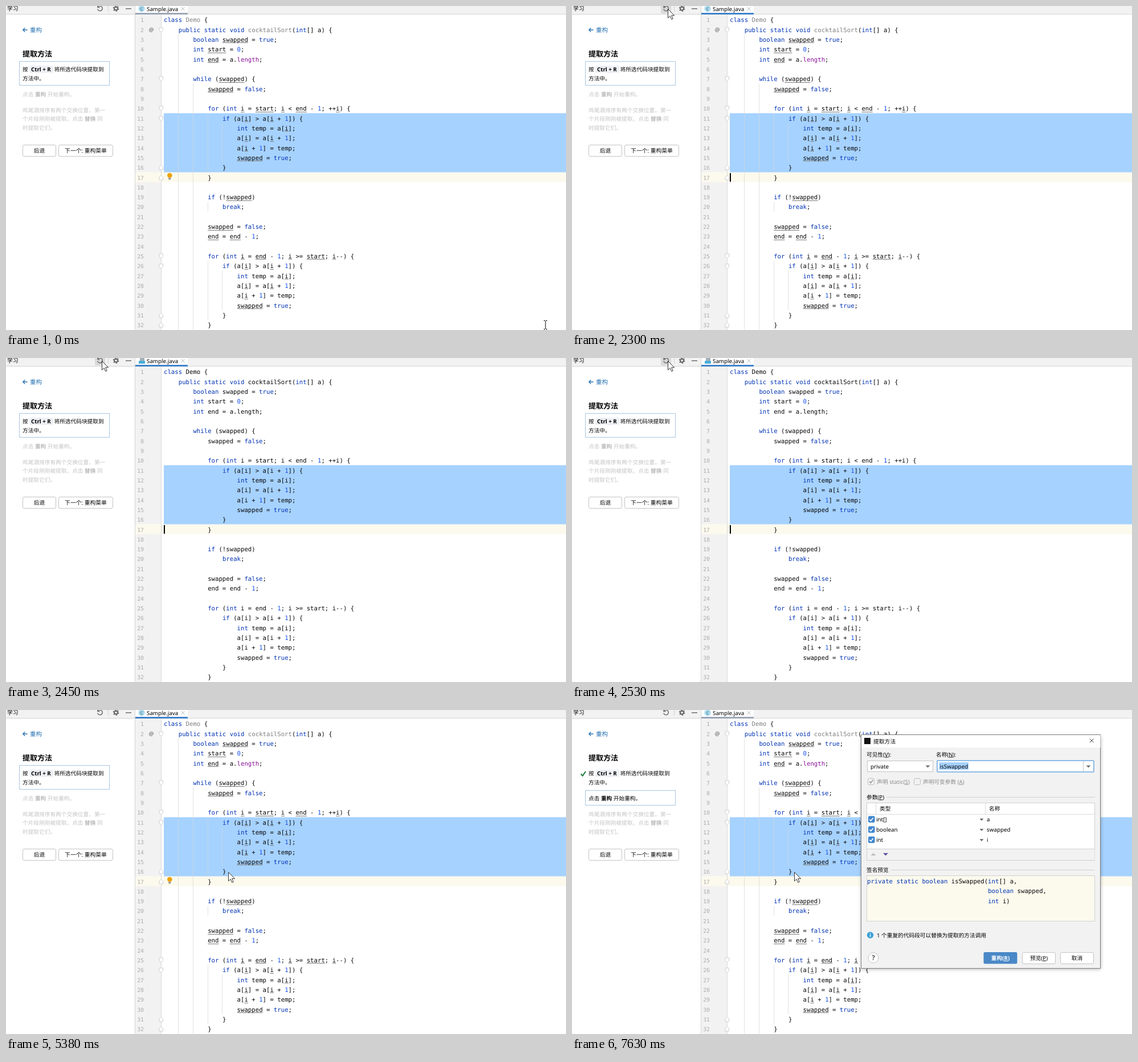
Recreate the animation shown at these times as an HTML page. Size 983 by 570 pixels, loop 8 s.

```html
<!DOCTYPE html>
<html lang="zh-CN">
<head>
<meta charset="utf-8">
<style>
  html, body { margin: 0; width: 100%; height: 100%; overflow: hidden; background: #fff; }
  svg { display: block; width: 983px; height: 570px; }
  text { font-family: "Noto Sans", "Noto Sans CJK SC", "Noto Sans CJK", sans-serif; white-space: pre; text-rendering: geometricPrecision; }
  .mono { font-family: "DejaVu Sans Mono", monospace; font-size: 10.68px; fill: #080808; }
  .b { font-weight: 700; }
  .u { text-decoration: underline; text-decoration-thickness: 1px; }
  .kw { fill: #0033b3; }
  .num { fill: #1750eb; }
  .rich .unused { fill: #808080; }
  .rich .field { fill: #871094; }
  .extra { display: none; }
  .rich .extra { display: inline; }
  .step { fill: #c4c4c4; }
  .step .b { fill: #bababa; }
  .step .key { fill: #f7f7f8; }
  .step.on, .step.on .b { fill: #000; }
  .step.on .key { fill: #edf0f4; }
</style>
</head>
<body>
<svg id="stage" viewBox="0 0 983 570"></svg>
<script>
const CH = 6.43, ROW = 17.32, LEFT = 277, TOP = 15.4, BASE = 13;
const rowY = n => TOP + ROW * (n - 1);

const SOURCE = `class Demo {
    public static void cocktailSort(int[] a) {
        boolean swapped = true;
        int start = 0;
        int end = a.length;

        while (swapped) {
            swapped = false;

            for (int i = start; i < end - 1; ++i) {
                if (a[i] > a[i + 1]) {
                    int temp = a[i];
                    a[i] = a[i + 1];
                    a[i + 1] = temp;
                    swapped = true;
                }
            }

            if (!swapped)
                break;

            swapped = false;
            end = end - 1;

            for (int i = end - 1; i >= start; i--) {
                if (a[i] > a[i + 1]) {
                    int temp = a[i];
                    a[i] = a[i + 1];
                    a[i + 1] = temp;
                    swapped = true;
                }
            }`.split('\n');

// Drawing helpers
const attrs = o => Object.entries(o).map(([k, v]) => `${k}="${v}"`).join(' ');
const rect = (x, y, w, h, fill, o = {}) =>
  `<rect x="${x}" y="${y}" width="${w}" height="${h}" ${attrs(fill ? { fill, ...o } : o)}/>`;
const box = (x, y, w, h, fill, stroke, o = {}) =>
  rect(x + .5, y + .5, w, h, fill, { stroke, ...o });
const path = (d, o = {}) => `<path d="${d}" ${attrs({ fill: 'none', ...o })}/>`;
const dot = (x, y, r, fill, o = {}) =>
  `<circle cx="${x}" cy="${y}" r="${r}" fill="${fill}" ${attrs(o)}/>`;
const group = (id, body, o = {}) => `<g id="${id}" ${attrs(o)}>${body}</g>`;
const text = (x, mid, s, size = 9.7, o = {}) =>
  `<text x="${x}" y="${mid + size * .37}" font-size="${size}" ${attrs(o)}>${s}</text>`;
const bold = s => `<tspan class="b">${s}</tspan>`;
const hot = (s, k) => `${s}(<tspan class="u">${k}</tspan>)`;
const mid = { 'text-anchor': 'middle' };

const KEYWORDS = /^(class|public|private|static|void|boolean|int|while|for|if|break|true|false)$/;
const esc = s => s.replace(/</g, '&lt;').replace(/>/g, '&gt;');
function paint(line) {
  return line.split(/(\w+)/).map(w => {
    const cls = KEYWORDS.test(w) ? 'kw' : /^\d+$/.test(w) ? 'num'
      : /^(Demo|cocktailSort)$/.test(w) ? 'unused' : w === 'length' ? 'field' : '';
    return cls ? `<tspan class="${cls}">${w}</tspan>` : esc(w);
  }).join('');
}
function code(x, y, line) {
  const indent = line.search(/\S/);
  return indent < 0 ? '' : `<text class="mono" x="${x + indent * CH}" y="${y}">${paint(line.trim())}</text>`;
}
const underlines = (line, n) => [...line.matchAll(/\b(swapped|start|end|i)\b/g)].map(m =>
  rect(LEFT + m.index * CH, Math.round(rowY(n) + 14.4), m[0].length * CH, 1, '#777')).join('');

function foldMark(n, closing) {
  const s = closing ? -1 : 1, y = Math.round(rowY(n) + 9.1);
  return path(`M269 ${y - 4 * s}H275.5V${y + s}L272.3 ${y + 4 * s}L269 ${y + s}Z`, { fill: '#fff', stroke: '#cfcfcf' });
}
const guide = (col, from, to) =>
  rect(Math.floor(LEFT + col * CH), rowY(from), 1, ROW * (to - from + 1), '#d6d6d6', { opacity: .7 });

function editor() {
  const lines = SOURCE.map((s, i) => code(LEFT, rowY(i + 1) + BASE, s)).join('');
  const numbers = SOURCE.map((s, i) => `<text class="mono" x="242" y="${rowY(i + 1) + BASE}"
    text-anchor="end" style="fill:#adadad;font-size:9.8px">${i + 1}</text>`).join('');
  const guides = [[4, 3, 32], [8, 8, 32], [12, 11, 16], [16, 12, 15], [12, 20, 20], [12, 26, 31], [16, 27, 30]];
  return rect(226, 0, 757, 570, '#fff') + rect(226, 0, 757, 14, '#f2f2f2') + rect(226, 14, 757, 1, '#d8d8d8')
    + rect(227, 0, 92, 14, '#fff') + rect(227, 12, 92, 3, '#9ca7b8', { id: 'tabLine' })
    + group('classIcon', dot(238, 4.8, 5.6, '#a9d9ec') + text(238, 4.8, 'C', 7.5, { ...mid, fill: '#39606f' }))
    + group('fileIcon', rect(235, 0, 8, 6, '#a3afb8') + rect(233, 5, 11, 5, '#49aeda'))
    + text(247, 5, 'Sample.java', 9.8)
    + path('M307.5 2l6 6m0-6l-6 6', { stroke: '#b4b4b4' })
    + rect(226, 15, 46, 555, '#f2f2f2') + rect(226, rowY(17), 757, ROW, '#fcfaed')
    + rect(272, 15, 1, 555, '#d9d9d9') + rect(226, 0, 1, 570, '#d5d5d5')
    + rect(LEFT, rowY(11), 706, ROW * 6, '#a6d2ff')
    + group('marks', guides.map(g => guide(...g)).join('')
      + SOURCE.map((s, i) => underlines(s, i + 1)).join('')
      + [2, 7, 10, 11, 25, 26].map(n => foldMark(n)).join('')
      + [16, 17, 31, 32].map(n => foldMark(n, true)).join('')
      + text(255, 41, '@', 9.6, { ...mid, fill: '#555' }), { class: 'extra' })
    + numbers + lines
    + group('bulb', dot(287.3, 298, 4.3, '#eda200') + rect(285, 302.5, 4.6, 1.2, '#767676') + rect(285.6, 304.2, 3.4, 1.2, '#767676'))
    + rect(277, 294, 2, 15, '#000', { id: 'caret' });
}

function welcome() {
  const rows = [['随处搜索', 581, 'Ctrl+T'], ['项目视图', 581, 'Ctrl+Alt+L'], ['转到文件', 581, 'Ctrl+Shift+T'],
    ['最近的文件', 594, 'Ctrl+逗号'], ['导航栏', 568.5, 'Ctrl+F2'], ['将文件拖放到此处以打开', 0, '']];
  return rect(226, 0, 757, 570, '#cccccd') + rows.map(([label, x, keys], i) =>
    text(526, 194 + 30.8 * i, label, 12.95, { fill: '#787878' })
    + text(x, 194 + 30.8 * i, keys, 13.7, { fill: '#2f6ba3' })).join('');
}

const button = (x, y, w, label, size = 9.7) =>
  box(x, y, w, 20, '#fff', '#c4c4c4', { rx: 2.5 }) + text(x + w / 2 + .5, y + 10.3, label, size, mid);

function panel() {
  const step = (id, body) => group(id, body, { class: 'step' });
  return rect(0, 0, 226, 570, '#fff') + rect(0, 0, 226, 14, '#f2f2f2') + rect(0, 14, 226, 1, '#d1d1d1')
    + text(2, 4, '学习', 9.8)
    + rect(156, -3, 18, 16, '#d9d9d9', { id: 'hover', rx: 2 })
    + path('M162 1.2A4.3 4.3 0 1 1 160.8 5.4M161 -1V2.4H164.6', { stroke: '#6e6e6e', 'stroke-width': 1.5 })
    + rect(179, 0, 1, 10, '#d1d1d1')
    + dot(193, 4.5, 2.9, 'none', { stroke: '#6e6e6e', 'stroke-width': 2.2 })
    + dot(193, 4.5, 4.5, 'none', { stroke: '#6e6e6e', 'stroke-width': 1.8, 'stroke-dasharray': '2.3 2.41' })
    + rect(210, 4, 10, 1.5, '#6e6e6e')
    + path('M37.5 42H30M33.3 38.5L29.8 42l3.5 3.5', { stroke: '#2470b3', 'stroke-width': 1.3 })
    + text(42, 42, '重构', 10.5, { fill: '#2470b3' })
    + text(29, 84, '提取方法', 13, { class: 'b' })
    + group('box1', box(23, 97, 158, 42, '#fff', '#a9c6e0'))
    + group('box2', box(23, 141, 158, 26, '#fff', '#a9c6e0'))
    + path('M15.5 112.3L18.6 115.8L24 108', { id: 'check', stroke: '#1b7a37', 'stroke-width': 2 })
    + step('step1', rect(41, 105, 42, 13, '', { class: 'key', rx: 2 })
      + text(29, 111.4, '按') + text(44, 111.4, 'Ctrl + R', 9.7, { class: 'b' })
      + text(84.5, 111.4, '将所选代码块提取到') + text(29, 127, '方法中。'))
    + step('step2', text(29, 155, `点击 ${bold('重构')} 开始重构。`))
    + step('step3', text(29, 183.5, '鸡尾酒排序有两个交换位置。第一')
      + text(29, 198.7, `个片段刚刚被提取。点击 ${bold('替换')} 同`) + text(29, 214, '时提取它们。'))
    + button(29, 244, 58, '后退') + button(92, 244, 95, '下一个: 重构菜单', 9.8);
}

const down = (x, y, w = 4, h = 4, fill = '#6e6e6e') => path(`M${x - w} ${y - h / 2}h${2 * w}l${-w} ${h}z`, { fill });
const tick = (x, y, color) => path(`M${x - 3} ${y}l2.3 2.6l4-5.4`, { stroke: color, 'stroke-width': 1.6 });

function dialog() {
  const grey = { fill: '#8c8c8c' };
  const titled = (y, label, x) => text(517, y, label) + rect(x, y, 918 - x, 1, '#d1d1d1');
  const params = [['int[]', 'a'], ['boolean', 'swapped'], ['int', 'i']].map(([type, name], i) => {
    const y = 192.5 + 18 * i;
    return rect(520, y - 6, 11.5, 11.5, '#3f87cf', { rx: 2 }) + tick(525.3, y, '#fff')
      + text(534, y + .3, type, 9.8) + down(719, y + .5, 3.5) + text(728, y + .3, name, 9.8);
  }).join('');
  const signature = ['private static boolean isSwapped(int[] a,', ' '.repeat(33) + 'boolean swapped,', ' '.repeat(33) + 'int i)'];
  return rect(508, 46, 420, 410, '#000', { filter: 'url(#blur)', opacity: .3 })
    + box(507, 43, 420, 411, '#f2f2f2', '#7d7d7d') + rect(508, 44, 419.5, 22, '#fff')
    + rect(513, 49, 11, 11, '#111') + text(529, 55, '提取方法', 9.8)
    + path('M909 50.5l6.5 6.5m0-6.5l-6.5 6.5', { stroke: '#333' })
    + text(517, 78, hot('可见性', 'V') + ':') + text(639, 78, hot('名称', 'N') + ':')
    + box(518, 89, 115, 19, '#fff', '#c4c4c4') + text(524, 99, 'private', 9.8) + down(624.5, 99.5)
    + rect(641, 89, 275, 20, '#fff', { stroke: '#8fbbe8', 'stroke-width': 2, rx: 1.5 })
    + rect(897, 90, 1, 18, '#c4c4c4') + down(906.5, 99.5)
    + rect(644.5, 92, 51.5, 13, '#a6d2ff') + text(645.5, 99, 'isSwapped', 9.9) + rect(696, 92, 1, 13, '#000', { id: 'fieldCaret' })
    + box(519, 120, 11, 11, '#f2f2f2', '#bdbdbd', { rx: 2 }) + tick(525, 125.8, '#999')
    + text(535, 126, hot('声明 static', 'S'), 9.8, grey)
    + box(600, 120, 11, 11, '#f2f2f2', '#bdbdbd', { rx: 2 }) + text(616, 126, hot('声明可变参数 ', 'A'), 9.7, grey)
    + titled(153, hot('参数', 'P'), 552)
    + box(517, 163, 400, 101, '#fff', '#cfcfcf') + rect(518, 183, 399, 1, '#dadada')
    + rect(533, 164, 1, 19, '#dadada') + rect(725, 164, 1, 19, '#dadada')
    + text(540, 173.7, '类型') + text(732, 173.7, '名称') + params
    + rect(518, 244, 399.5, 20, '#f2f2f2') + rect(518, 244, 399.5, 1, '#d1d1d1')
    + path('M524.5 256h9l-4.5-4.5z', { fill: '#bdbdbd' }) + down(550.5, 254, 4.5, 4.5, '#5c4fa3')
    + titled(281, '签名预览', 560)
    + box(517, 291, 400, 80, '#fcfaed', '#d1d1d1')
    + signature.map((s, i) => code(518, 305 + ROW * i, s)).join('')
    + dot(523.5, 396, 5.7, '#389fd6') + rect(522.8, 395, 1.5, 4.3, '#fff') + rect(522.8, 392.4, 1.5, 1.5, '#fff')
    + text(535, 396.5, '1 个重复的代码段可以替换为提取的方法调用')
    + dot(529, 436, 9, '#fff', { stroke: '#c4c4c4' }) + text(529, 436, '?', 12, { ...mid, class: 'b', fill: '#555' })
    + rect(722.5, 426, 59, 20.5, '#4a88c7', { rx: 2.5 })
    + text(752, 436.5, hot('重构', 'R'), 9.7, { ...mid, class: 'b', fill: '#fff' })
    + button(790, 426, 58, hot('预览', 'P')) + button(857, 426, 58, '取消');
}

const popup = () => box(417, 240, 241, 29, '#f7f7f7', '#b4b4b4')
  + '<text class="mono b" x="425" y="251.8" style="font-size:7.4px">int i = start</text>'
  + [253, 257, 261].map(y => dot(649, y, 1.1, '#6e6e6e')).join('');

document.getElementById('stage').innerHTML =
  '<defs><filter id="blur" x="-10%" y="-10%" width="120%" height="120%"><feGaussianBlur stdDeviation="3"/></filter></defs>'
  + group('editor', editor()) + group('welcome', welcome()) + panel()
  + group('popup', popup()) + group('dialog', dialog())
  + group('arrow', path('M.5 .5V16L4.2 12.6L6.8 18.5L9.2 17.4L6.7 11.7H11.6Z',
    { fill: '#fff', stroke: '#000', 'stroke-width': .8, 'stroke-linejoin': 'round' }))
  + group('beam', path('M-3 -7.5H-1L0 -6.5L1 -7.5H3M0 -6.5V6.5M-3 7.5H-1L0 6.5L1 7.5H3', { stroke: '#000' }));

// Pointer moves: first step, last step, number of steps, end point
const MOVES = [
  [70, 530, 7, 382, 251], [610, 690, 2, 395, 274], [840, 1610, 11, 101, 49], [1680, 1990, 5, 168, 5],
  [2610, 2990, 6, 420, 228], [3140, 3140, 1, 416, 228], [3370, 3370, 1, 416, 227], [4310, 4770, 7, 390, 285]];
const ease = p => p * p * (3 - 2 * p);
function pointer(t) {
  let x = 947, y = 561;
  for (const [from, to, n, ex, ey] of MOVES) {
    if (t < from) break;
    const done = n > 1 ? Math.floor((t - from) / (to - from) * (n - 1) + .02) + 1 : 1;
    const p = ease(Math.min(1, done / n));
    x += (ex - x) * p;
    y += (ey - y) * p;
  }
  return [x, y];
}

const el = id => document.getElementById(id);
const show = (id, on) => { el(id).style.display = on ? 'inline' : 'none'; };
const BLINKS = [2220, 3450, 3910, 4390, 4920, 5380, 5930, 6390, 6940, 7090];

function draw(t) {
  const within = (a, b) => t >= a && t < b;
  const blank = within(2370, 2450), raw = within(2450, 2690), modal = t >= 7090;
  show('welcome', blank);
  show('editor', !blank);
  el('editor').setAttribute('class', raw ? '' : 'rich');
  show('classIcon', !raw);
  show('fileIcon', raw);
  el('tabLine').setAttribute('fill', within(2220, 7090) ? '#4083c9' : '#9ca7b8');
  show('bulb', t < 2220 || within(3450, 6940));
  show('caret', BLINKS.filter(b => t >= b).length % 2);
  show('popup', within(3910, 4390));
  show('dialog', modal);
  show('fieldCaret', t < 7630);

  show('box1', !blank && t < 6940);
  show('check', t >= 6940);
  show('box2', t >= 7170);
  el('step1').classList.toggle('on', !blank);
  el('step2').classList.toggle('on', t >= 7170);

  const [x, y] = pointer(t);
  const typing = x > 272 && y > 15 && (y < 189 || y > 293);
  show('hover', x > 155 && x < 174 && y < 13);
  show('beam', typing);
  show('arrow', !typing);
  el(typing ? 'beam' : 'arrow').setAttribute('transform', `translate(${Math.round(x)} ${Math.round(y)})`);
}

function loop() {
  draw(performance.now() % 8000);
  requestAnimationFrame(loop);
}
loop();
</script>
</body>
</html>
```
